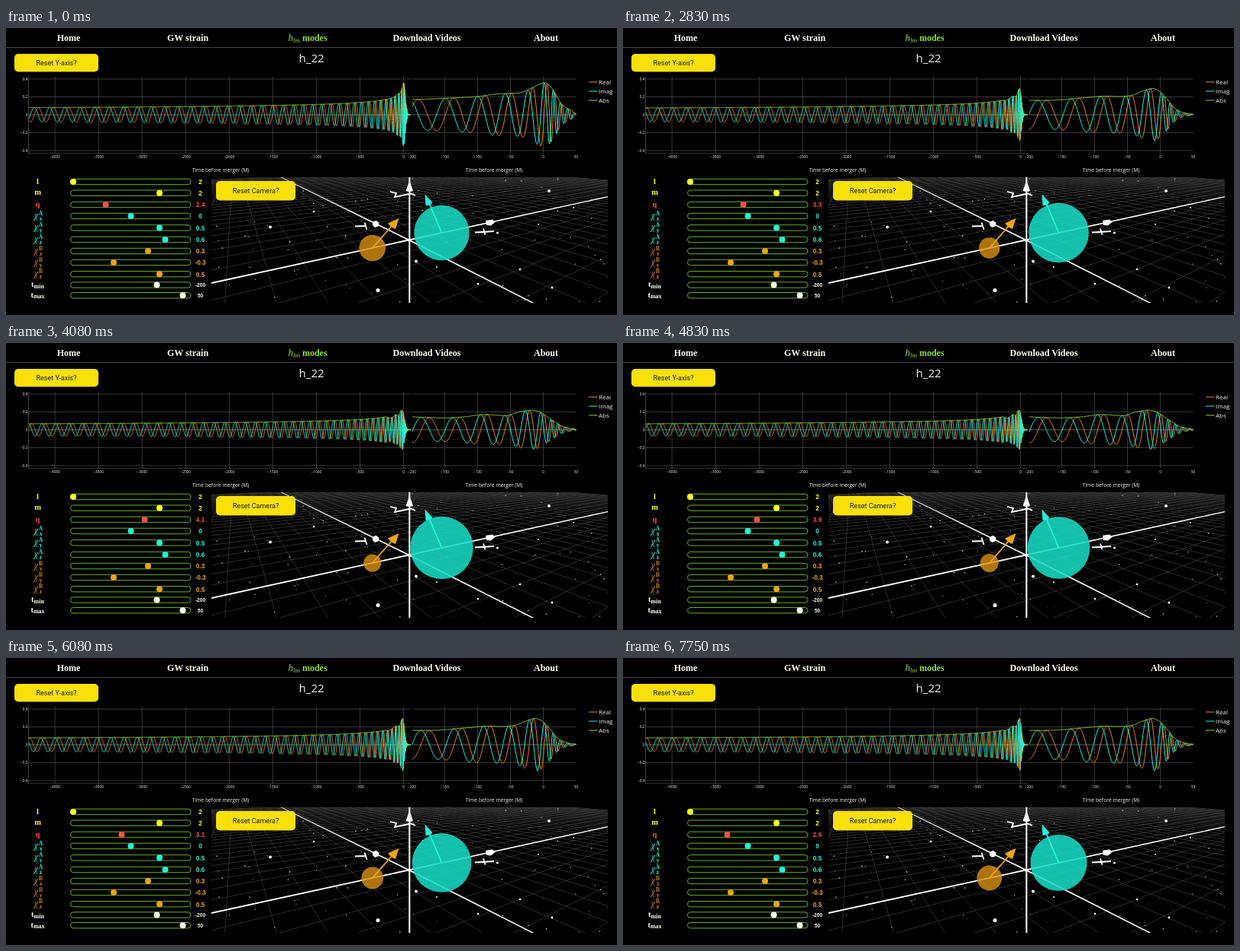
An HTML page that plays this animation: 800x377 px, repeating every 8 s.

```html
<!DOCTYPE html>
<html lang="en">
<head>
<meta charset="utf-8">
<title>h_lm modes</title>
<style>
  html, body { margin: 0; width: 100%; height: 100%; overflow: hidden; background: #000; }
  svg { display: block; width: 100%; height: 100%; }
  .serif { font-family: "Liberation Serif", serif; font-weight: bold; }
  .plot { font-family: "Open Sans", sans-serif; fill: #f2f2f2; }
  .button { font-family: Roboto, sans-serif; font-size: 9px; fill: #1c1c00; }
  .value { font-family: "Liberation Sans", sans-serif; font-weight: bold; }
  .math { font-style: italic; font-weight: normal; }
</style>
</head>
<body>
<svg id="stage" viewBox="0 0 800 377" preserveAspectRatio="none">
  <defs>
    <clipPath id="longClip"><rect x="29.5" y="64" width="501" height="101"/></clipPath>
    <clipPath id="zoomClip"><rect x="531.5" y="64" width="215" height="101"/></clipPath>
    <clipPath id="sceneClip"><rect x="269" y="196" width="519" height="165"/></clipPath>
  </defs>
</svg>
<script>
const stage = document.getElementById('stage');
const CYAN = '#22f5dc', ORANGE = '#eda512', REAL = '#e08a28', GREEN = '#96d420';
const YELLOW = '#ffff1a', RED = '#f8504a', IVORY = '#fffff0', DARK_ORANGE = '#c9821a';

function add(tag, attrs, parent = stage, content = '') {
  const node = document.createElementNS('http://www.w3.org/2000/svg', tag);
  for (const key in attrs) node.setAttribute(key, attrs[key]);
  node.innerHTML = content;
  parent.appendChild(node);
  return node;
}
const line = (x1, y1, x2, y2, stroke, width = 1, parent = stage) =>
  add('line', { x1, y1, x2, y2, stroke, 'stroke-width': width }, parent);
const circle = (cx, cy, r, fill, parent = stage) => add('circle', { cx, cy, r, fill }, parent);
const path = (d, attrs, parent = stage) => add('path', { d, fill: 'none', ...attrs }, parent);
const text = (content, x, y, size, cls, fill, anchor = 'middle') =>
  add('text', { x, y, class: cls, 'text-anchor': anchor, style: `font-size:${size}px;` + (fill ? `fill:${fill}` : '') }, stage, content);

function button(label, x, y, width, height) {
  add('rect', { x, y, width, height, rx: 5, fill: '#f8e008' });
  text(label, x + width / 2, y + height / 2 + 3.2, 9, 'button');
}

// Header
[['Home', 82], ['GW strain', 238], ['Download Videos', 551], ['About', 707]]
  .forEach(([label, x]) => text(label, x, 17, 12, 'serif', IVORY));
text('<tspan class="math" font-size="13">h</tspan><tspan class="math" font-size="9" dy="2">lm</tspan><tspan dy="-2"> modes</tspan>',
  395, 17, 12, 'serif', '#8ee02a');
line(0, 25.5, 800, 25.5, '#40463c');
button('Reset Y-axis?', 11, 34, 110, 23.5);
text('h_22', 400, 45, 15, 'plot');

// Plot frames
const strainY = h => 114 - h * 117.5;
const longX = t => 520.5 + t * 0.1141;
const zoomX = t => 703.5 + t * 0.86;

for (let h = -0.4; h < 0.5; h += 0.2) {
  const y = strainY(h), zero = Math.abs(h) < 0.01;
  line(29.5, y, 530, y, zero ? '#777' : '#444', 0.8);
  line(531.5, y, 746.5, y, zero ? '#777' : '#444', 0.8);
  text(zero ? '0' : h.toFixed(1).replace('-', '−'), 28.5, y + 1.7, 4.8, 'plot', null, 'end');
}
function timeTicks(toX, from, to, step, edges) {
  for (let t = from; t <= to; t += step) {
    if (!edges.includes(t)) line(toX(t), 64, toX(t), 165, '#444', 0.8);
    text(String(t).replace('-', '−'), toX(t), 171, 4.8, 'plot');
  }
}
timeTicks(longX, -4000, 0, 500, []);
timeTicks(zoomX, -200, 50, 50, [-200, 50]);
line(29.5, 64, 29.5, 165, '#555', 0.8);
line(29.5, 164.6, 530, 164.6, '#555', 0.6);
text('Time before merger (M)', 281, 188.5, 6.78, 'plot');
text('Time before merger (M)', 639, 188.5, 6.78, 'plot');
[['Real', REAL], ['Imag', CYAN], ['Abs', GREEN]].forEach(([label, color], i) => {
  const y = 71 + i * 12;
  line(763, y, 774.5, y, color);
  text(label, 776, y + 3, 8, 'plot', null, 'start');
});

// Waveforms: Newtonian inspiral, then an amplitude curve through a few points of the zoomed plot
const MODELS = {
  2: { gain: 1.2, troughX: 564, late: [[531.5, 94], [560, 93], [585, 92], [617, 90], [640, 87], [660, 86], [676, 84.5], [690, 78], [704, 72], [711, 75], [718, 84], [726, 98], [734, 105], [740, 108], [747, 113], [790, 114]] },
  3: { gain: 1.09, troughX: 531.5, late: [[531.5, 95], [560, 95], [600, 92], [630, 89.5], [650, 90], [668, 88], [680, 83], [693, 79.5], [702, 83], [712, 93], [720, 103], [730, 110], [747, 113.3], [790, 114]] },
  4: { gain: 0.93, troughX: 575, late: [[531.5, 97], [570, 98.5], [600, 97], [625, 94], [645, 95], [658, 95], [670, 91], [682, 88.7], [690, 88.3], [700, 91], [710, 98], [720, 104.5], [730, 110], [747, 113.3], [790, 114]] }
};

function smoothCurve(points, x) {
  const slope = i => {
    const a = points[Math.max(i - 1, 0)], b = points[Math.min(i + 1, points.length - 1)];
    return (b[1] - a[1]) / (b[0] - a[0]);
  };
  let i = 0;
  while (i < points.length - 2 && x > points[i + 1][0]) i++;
  const [x0, y0] = points[i], [x1, y1] = points[i + 1];
  const w = x1 - x0, s = Math.min((x - x0) / w, 1), r = 1 - s;
  return r * r * (1 + 2 * s) * y0 + s * s * (3 - 2 * s) * y1 + w * s * r * (r * slope(i) - s * slope(i + 1));
}

function waveform(q) {
  const { gain, troughX, late } = MODELS[q];
  const eta = q / (1 + q) ** 2, ringdown = 0.58;
  const orbit = tau => 0.25 * (eta * Math.max(tau, 0.05) / 5) ** -0.25;
  const omega = t => ((2 * orbit(12 - t) ** 1.5) ** -4 + ringdown ** -4) ** -0.25;
  const samples = [];
  const troughTime = (troughX - 703.5) / 0.86;
  let phase = 0, shift = 0;
  for (let t = -4300; t <= 85; t += 0.5) {
    phase += omega(t) * 0.5;
    if (t <= troughTime) shift = Math.PI - phase;
    const abs = t < -200 ? gain * orbit(-t) : (114 - smoothCurve(late, zoomX(t))) / 117.5;
    samples.push({ t, abs, phase });
  }
  return samples.map(({ t, abs, phase }) =>
    ({ t, values: [abs * Math.cos(phase + shift), -abs * Math.sin(phase + shift), abs] }));
}

const waves = {};
for (const q in MODELS) {
  const samples = waveform(+q);
  waves[q] = add('g', { display: 'none' });
  for (const [toX, clip, start] of [[longX, 'longClip', -4300], [zoomX, 'zoomClip', -200]]) {
    const group = add('g', { 'clip-path': `url(#${clip})` }, waves[q]);
    const shown = samples.filter(s => s.t >= start);
    [REAL, CYAN, GREEN].forEach((stroke, i) => {
      const d = 'M' + shown.map(s => toX(s.t).toFixed(2) + ',' + strainY(s.values[i]).toFixed(2)).join('L');
      path(d, { stroke, 'stroke-width': 1, 'stroke-linejoin': 'round' }, group);
    });
  }
}

// Sliders
const chi = (axis, body) =>
  `<tspan class="math" font-size="12" x="39.5">χ</tspan><tspan font-size="7.5" x="45.5" dy="-4">${body}</tspan><tspan font-size="7.5" x="45.5" dy="7">${axis}</tspan>`;
const timeLabel = sub => `t<tspan font-size="8" dy="1.5">${sub}</tspan>`;
const SLIDERS = [
  ['l', 202, 88, '2', YELLOW], ['m', 216.7, 201, '2', YELLOW], ['q', 232, 130.5, '2.4', RED],
  [chi('x', 'A'), 247, 163.5, '0', CYAN], [chi('y', 'A'), 262.4, 201, '0.5', CYAN], [chi('z', 'A'), 278, 208.5, '0.6', CYAN],
  [chi('x', 'B'), 293, 186, '0.3', ORANGE], [chi('y', 'B'), 308, 141, '-0.3', ORANGE], [chi('z', 'B'), 323.2, 201, '0.5', ORANGE],
  [timeLabel('min'), 337.5, 197.5, '-200', IVORY], [timeLabel('max'), 351.2, 231.5, '50', IVORY]
].map(([label, y, x, value, color]) => {
  const white = color === IVORY;
  add('rect', { x: 84.5, y: y - 3.7, width: 157.5, height: 7.4, rx: 3.7, fill: '#000', stroke: '#66b01c', 'stroke-width': 1 });
  text(label, 41.5, y + 2.5, 10.5, 'serif', color === ORANGE ? DARK_ORANGE : color);
  return {
    knob: circle(x, y, 4, color),
    value: text(value, 254.5, y + (white ? 2.3 : 3.4), white ? 6.6 : 8.2, 'value', color)
  };
});
const qSlider = SLIDERS[2];

// 3D scene: camera aimed at the origin, unit distance away
const scene = add('g', { 'clip-path': 'url(#sceneClip)' });
const CENTER = [528.5, 278.5], FOCAL = 330, NEAR = 0.06;
const SIN_E = 0.334, COS_E = 0.943, SIN_A = 0.55, COS_A = 0.835;
const toCamera = (u, v) => {
  const away = u * SIN_A + v * COS_A;
  return [u * COS_A - v * SIN_A, away * SIN_E, 1 + away * COS_E];
};
function planeLine(u1, v1, u2, v2, stroke, width) {
  let a = toCamera(u1, v1), b = toCamera(u2, v2);
  if (a[2] > b[2]) [a, b] = [b, a];
  if (b[2] < NEAR) return;
  if (a[2] < NEAR) {
    const k = (NEAR - a[2]) / (b[2] - a[2]);
    a = a.map((value, i) => value + k * (b[i] - value));
  }
  const screen = p => [CENTER[0] + FOCAL * p[0] / p[2], CENTER[1] - FOCAL * p[1] / p[2]];
  line(...screen(a), ...screen(b), stroke, width, scene);
}
const CELL = 0.1, CELLS = 32, EXTENT = CELL * CELLS;
for (let i = -CELLS; i <= CELLS; i++) {
  planeLine(i * CELL, -EXTENT, i * CELL, EXTENT, '#484848', 0.6);
  planeLine(-EXTENT, i * CELL, EXTENT, i * CELL, '#484848', 0.6);
}

let seed = 11;
const random = () => (seed = seed * 16807 % 2147483647) / 2147483647;
for (let i = 0; i < 110; i++) circle(269 + random() * 519, 198 + random() * 162, 0.3 + random() * 0.55, '#ddd', scene);
[[711, 214, 2], [346, 261.5, 2], [537, 306.5, 2], [487, 344.5, 2.5], [743, 236, 1], [697, 258, 1], [403, 241, 1.3],
 [715, 341, 1.4], [618, 336, 1.3], [673, 317, 1.3], [564, 314, 1], [643.5, 269, 1.6]]
  .forEach(([x, y, r]) => circle(x, y, r, '#fff', scene));

const solid = (d, fill) => path(d, { fill }, scene);
solid('M269 333.9L788 220.9V222.3L269 336.1Z', '#fff');
solid('M361 196L528.5 278L691.3 361H688.2L528 279.8L359.2 196Z', '#fff');
line(528.3, 196, 528.3, 361, '#fff', 2, scene);
solid('M528.3 200L533 214Q528.3 216 523.6 214Z', '#fff');
solid('M628 253L637 251.5L640.5 255L635 259.5L629 259Z', '#fff');
solid('M480 255L484.5 252.8L488.5 256L487.5 260.5L483 262L480 259Z', '#fff');
for (const d of ['M457 260.5L471 260M469.5 255.5L472.5 265', 'M614 268.5L639 267M625 263.5L627.5 271.5', 'M503 215L511 217L509 222L530 217.5L536 220'])
  path(d, { stroke: '#fff', 'stroke-width': 1.8 }, scene);

const bigHole = circle(570.5, 269, 36, '#17dac4', scene);
const smallHole = circle(479.7, 289, 17, '#d99212', scene);
bigHole.setAttribute('opacity', 0.88);
smallHole.setAttribute('opacity', 0.8);
line(570.5, 269, 554, 230, CYAN, 1.8, scene);
solid('M548.5 218.5L558.5 229.5Q555 233.5 549.5 233Z', CYAN);
line(479.7, 289, 506, 259, ORANGE, 1.8, scene);
solid('M514.5 250L510 264Q504 262.5 500 256.5Z', ORANGE);
button('Reset Camera?', 275, 201, 104, 25.5);

// Mass ratio over time
const LOOP = 8000;
const RATIO_KEYS = [[0, 2.4], [2170, 2.4], [2830, 3.3], [3000, 3.5], [3080, 3.5], [4080, 4.1], [4330, 4.2], [5420, 3.5], [6750, 2.6], [LOOP, 2.6]];
function ratioAt(time) {
  const i = RATIO_KEYS.findIndex(([t]) => t > time);
  const [t0, q0] = RATIO_KEYS[i - 1], [t1, q1] = RATIO_KEYS[i];
  return Math.round((q0 + (q1 - q0) * (time - t0) / (t1 - t0)) * 10) / 10;
}

function draw() {
  const q = ratioAt(performance.now() % LOOP);
  qSlider.knob.setAttribute('cx', 130.5 + (q - 2.4) * 30);
  qSlider.value.textContent = q.toFixed(1);
  bigHole.setAttribute('r', 51.3 * q / (1 + q));
  smallHole.setAttribute('r', 59 / (1 + q));
  for (const key in waves) waves[key].setAttribute('display', +key === Math.round(q) ? 'inline' : 'none');
  requestAnimationFrame(draw);
}
draw();
</script>
</body>
</html>
```
